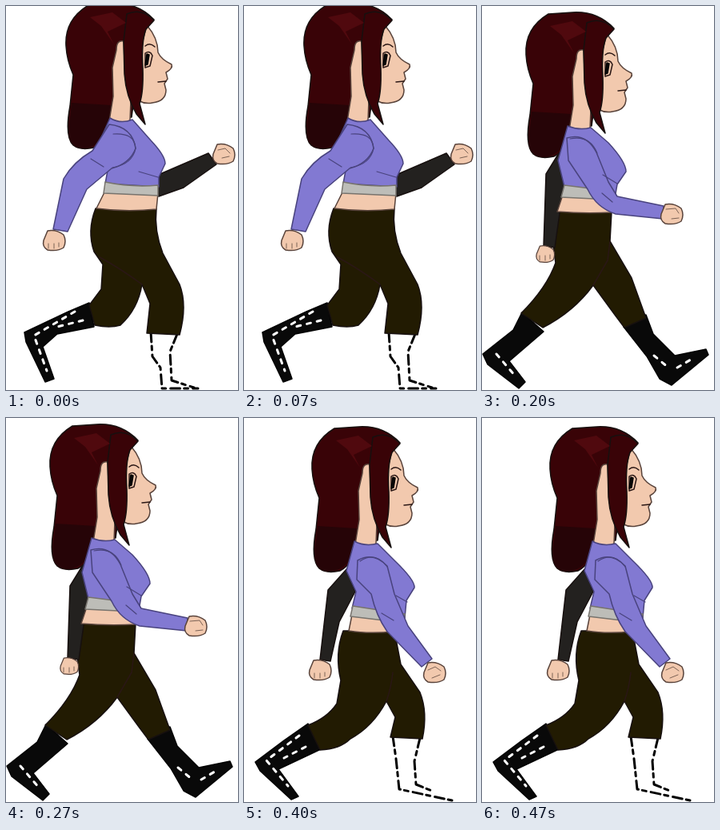
An HTML page for the animation above (590 ms loop, 290 px wide and 480 px high).

```html
<!DOCTYPE html>
<html lang="en">
<head>
<meta charset="utf-8">
<title>Walk cycle</title>
<style>
  html, body { margin: 0; width: 100%; height: 100%; overflow: hidden; background: #fff; }
  svg { display: block; width: 100vw; height: 100vh; }
  path { stroke: #17100f; stroke-width: 1.5; stroke-linejoin: round; stroke-linecap: round; }
  .hair { fill: #390307; }
  .tips { fill: #260407; stroke: none; }
  .shine { fill: #50090e; stroke: none; }
  .skin { fill: #f2c9ae; stroke: #58433b; }
  .top { fill: #8279d2; stroke: #49437e; }
  .sleeve { fill: #23211f; }
  .band { fill: #bdbdb8; stroke: #77736d; }
  .pants { fill: #221b02; }
  .boot { fill: #090909; stroke: #000; }
  .gap { fill: none; stroke: #fff; stroke-width: 3; stroke-dasharray: 5 8; }
  .worn { fill: none; stroke: #000; stroke-width: 3; stroke-dasharray: 12 5 5 6; }
  .line { fill: none; stroke: #49437e; stroke-width: 1.2; }
  .crease { fill: none; stroke: #7b6255; stroke-width: 1; }
  .ink { fill: none; stroke: #2a1715; }
</style>
</head>
<body>
<svg viewBox="0 0 290 480" preserveAspectRatio="none">
  <defs>
    <g id="head">
      <path class="hair" d="M103-1Q73 17 75 50Q76 68 84 86L80 125Q73 163 84 174Q93 181 110 177Q127 169 131 140L157 139L172 25L185 17Q164-5 133-3Z"/>
      <path class="tips" d="M82 121L132 124L129 148Q121 175 98 178Q72 179 80 140Z"/>
      <path class="skin" d="M176 24Q190 40 190 58Q194 67 207 73Q209 78 200 83L202 91L198 97L200 105Q200 119 183 121Q174 123 165 118L164 70Z"/>
      <path class="skin" d="M147 44Q138 42 138 55L133 77L134 113L129 144Q142 151 155 143L156 118L149 91Z"/>
      <path class="hair" d="M147 44L151 10Q170 2 185 18L175 29Q169 45 171 78Q172 108 167 122L174 148L163 135Q150 113 148 85Z"/>
      <path class="shine" d="M105 14L133 8L150 21L127 32L135 48L119 25Z"/>
      <path class="ink" d="M174 50Q180 45 186 51M174 59Q180 55 183 62L180 75L174 77ZM190 95L200 94"/>
      <path class="boot" d="M176 60L179 61L177 73L174 74Z"/>
    </g>
    <path id="fist" class="skin" d="M-8-12Q3-14 12-7Q16 1 12 9Q5 14-8 12Q-15 8-13 0Z"/>
    <path id="fingers" class="crease" d="M-7 4V10M0 4V10M6 3V8"/>
  </defs>

  <g class="pose">
    <path class="boot" d="M104 371L78 382L23 408L25 420L49 470L60 466L46 426L64 410L110 401Z"/>
    <path class="gap" d="M86 382L35 412L51 456M96 393L60 402"/>
    <path class="worn" d="M181 408L183 438L193 452L195 478H240M214 410L205 432L207 468L235 477"/>
    <path class="pants" d="M112 253Q101 281 110 307L121 323L119 354L104 374L111 399Q130 403 143 399Q165 379 170 348L180 372L176 409L217 411Q227 374 217 348L196 309Q185 281 188 253Z"/>
    <path class="ink" d="M117 314Q143 328 170 348"/>
    <path class="skin" d="M124 231L190 234L188 254Q150 258 113 253Z"/>
    <path class="sleeve" d="M188 212L253 184L263 198L222 227L191 238Z"/>
    <use href="#fist" x="272" y="185"/>
    <path class="crease" d="M265 180L274 178L280 184M270 190L279 188"/>
    <use href="#head"/>
    <path class="top" d="M130 140Q143 148 158 142L181 168Q199 187 199 197L191 214L191 226L124 222L129 195L117 169Z"/>
    <path class="band" d="M124 220Q157 227 190 224V237L122 234Z"/>
    <path class="top" d="M129 148Q158 151 162 178Q155 197 132 203L101 229L77 282L59 279L72 216Q84 195 108 181Z"/>
    <path class="line" d="M134 160Q161 158 162 178Q158 198 133 202M106 191L122 201M166 207L190 214"/>
    <use href="#fist" x="60" y="293"/>
    <use href="#fingers" x="60" y="293"/>
  </g>

  <g class="pose">
    <path class="boot" d="M50 383L39 405L1 435L7 448L46 478L54 470L34 444L77 407Z"/>
    <path class="boot" d="M177 401L205 386L214 410L241 437L280 429L283 436L237 474L222 466L206 438Z"/>
    <path class="gap" d="M18 435L42 463M215 437L233 452M244 452L266 439"/>
    <path class="pants" d="M93 257Q86 286 92 321Q81 352 49 384L76 402Q115 382 139 349L166 386L178 402L205 390L187 340L160 294L162 257Z"/>
    <path class="ink" d="M139 349L157 318L160 294"/>
    <path class="sleeve" d="M96 184L80 210L77 300L91 302L100 238L108 205Z"/>
    <use href="#fist" transform="translate(79 310) scale(.83)"/>
    <use href="#fingers" x="79" y="308"/>
    <path class="skin" d="M101 236L162 242L162 258Q128 260 94 257Z"/>
    <use href="#head" x="-20" y="11"/>
    <path class="top" d="M107 150Q122 156 136 152L158 171Q180 195 180 207L169 223L166 240L103 226L95 193Z"/>
    <path class="band" d="M103 224L159 231L160 242L99 239Z"/>
    <path class="top" d="M106 165Q130 158 143 183L158 220L169 238L227 250L226 266L167 260Q143 252 132 229L108 193Z"/>
    <path class="line" d="M110 166Q135 161 144 184M150 234L163 245M151 211L169 222"/>
    <use href="#fist" x="237" y="260"/>
    <path class="crease" d="M230 254L242 253L246 259M237 266L246 265"/>
  </g>

  <g class="pose">
    <path class="boot" d="M80 382L50 403L14 430L20 441L59 477L68 473L43 439L96 414Z"/>
    <path class="gap" d="M69 397L28 428L55 460M77 411L50 425"/>
    <path class="worn" d="M186 398L190 426L194 464L260 478M220 400L213 429L215 458L237 467"/>
    <path class="pants" d="M124 266Q113 295 121 328L116 357Q104 375 80 384L95 415Q120 414 133 401Q161 386 178 354L189 374L183 399L223 401Q230 368 220 343L196 308L188 266Z"/>
    <path class="ink" d="M178 354Q184 337 186 318"/>
    <path class="sleeve" d="M129 188L105 215L95 302L108 304L119 255L139 217Z"/>
    <use href="#fist" x="95" y="315"/>
    <use href="#fingers" x="95" y="315"/>
    <path class="skin" d="M135 246L190 251L188 267Q155 270 131 266Z"/>
    <use href="#head" x="10" y="14"/>
    <path class="top" d="M138 154Q151 161 167 157L188 178Q214 203 213 212L203 228L201 250L135 238L140 217L128 191Z"/>
    <path class="band" d="M136 235L201 245L200 256L133 248Z"/>
    <path class="top" d="M142 178Q162 167 179 185L188 220L205 260L235 301L222 311L179 267Q165 247 159 220L141 202Z"/>
    <path class="line" d="M145 179Q164 166 179 186M172 244L187 253M190 222L204 230"/>
    <use href="#fist" x="238" y="318"/>
    <path class="crease" d="M230 315L239 311L246 316M235 325L245 321"/>
  </g>
</svg>
<script>
  const LOOP = 590;
  const POSE_STARTS = [0, 200, 400];
  const poses = document.querySelectorAll(".pose");

  function draw(now) {
    const time = now % LOOP;
    const current = POSE_STARTS.findLastIndex(start => time >= start);
    poses.forEach((pose, i) => pose.style.display = i === current ? "" : "none");
    requestAnimationFrame(draw);
  }
  draw(0);
</script>
</body>
</html>
```
